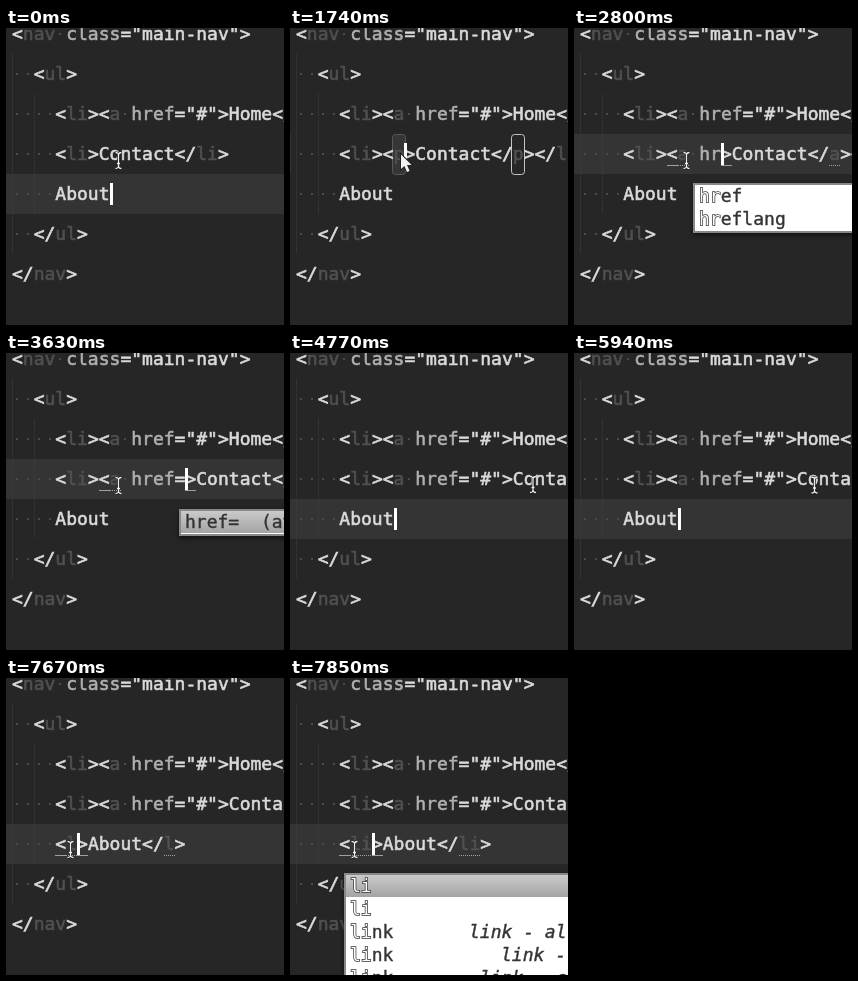
An HTML page with a canvas for the animation above (8 s loop, 278 by 297 pixels).

```html
<!DOCTYPE html>
<html lang="en">
<meta charset="utf-8">
<title>Wrapping text in tags</title>
<style>
html, body { margin: 0; width: 100%; height: 100%; overflow: hidden; background: #262626; }
canvas { display: block; }
</style>
<canvas width="278" height="297"></canvas>
<script>
const ctx = document.querySelector('canvas').getContext('2d');
const FONT = '18px "DejaVu Sans Mono", monospace';
const CHAR = 10.84, LIGHT = '#dadada', ATTR = '#b0b0b0', DIM = '#505050';
const LOOP = 8000, ITEM = 23;
const colX = col => 6 + col * CHAR;
const rowY = row => 6 + row * 40;

// Each step changes some properties of the editor from its time on.
const link = attr => `    <li><a${attr}>Contact</a></li>`;
const plain = { sel: [], under: [], arrow: false, popup: null };
const typing = (attr, popup = null) => ({
  ...plain, contact: link(attr), row: 3, col: 10 + attr.length, popup,
  under: [8, [9, 1], 10 + attr.length, [20 + attr.length, 1]]
});
const wrapped = (name, popup = null) => ({
  ...plain, about: `    <${name}>About</${name}>`, col: 5 + name.length, popup,
  under: [4, [5, name.length], 5 + name.length, [13 + name.length, name.length]]
});
const tagList = { x: 98, y: 155, typed: 1, items: ['a', 'abbr', 'acronym', 'address', 'applet', 'area'] };
const hrefList = { x: 120, y: 155, typed: 1, items: ['href', 'hreflang'] };
const valueList = { x: 174, y: 156, typed: 0, picked: true, items: ['href=  (attribute)'] };
const liList = {
  x: 55, y: 195, typed: 2, picked: true, items: ['li', 'li', 'link', 'link', 'link'],
  notes: [, , [179, 'link - alternate'], [211, 'link - atom'], [190, 'link - css']]
};
const steps = [
  [0, { ...plain, contact: '    <li>Contact</li>', about: '    About', row: 4, col: 9 }],
  [630, { row: 3, col: 10, under: [4, 7, 15] }],
  [770, { ...plain, col: 15, sel: [[8, 15]], arrow: true }],
  [1740, { contact: '    <li><p>Contact</p></li>', col: 10, sel: [[9, 10], [20, 21, 1]] }],
  [2370, typing('')],
  [2440, typing('', tagList)],
  [2580, typing(' ')],
  [2650, typing(' h')],
  [2730, typing(' h', hrefList)],
  [2800, typing(' hr', { ...hrefList, typed: 2 })],
  [2860, typing(' hre', { ...hrefList, typed: 3 })],
  [2930, typing(' href', { ...hrefList, typed: 4 })],
  [3000, typing(' href')],
  [3630, typing(' href=', valueList)],
  [3690, { ...typing(' href=""'), col: 17 }],
  [4110, { ...typing(' href="#"'), col: 18 }],
  [4770, { ...plain, row: 4, col: 9 }],
  [6750, { col: 5 }],
  [6810, { col: 9, sel: [[4, 9]], arrow: true }],
  [7230, { about: '    <p>About</p>', col: 6, sel: [[5, 6], [14, 15, 1]] }],
  [7650, wrapped('l')],
  [7720, wrapped('l', { ...liList, typed: 1 })],
  [7780, wrapped('li', { ...liList, typed: 1 })],
  [7850, wrapped('li', liList)]
];

function stateAt(t) {
  return Object.assign({}, ...steps.filter(s => s[0] <= t).map(s => s[1]));
}

const ease = u => u * u * (3 - 2 * u);
const phase = (t, from, to) => Math.min(1, Math.max(0, (t - from) / (to - from)));

function pointerAt(t) {
  if (t < 4770) return [112.5, 132.5];
  const out = ease(phase(t, 5910, 6400)), back = ease(phase(t, 6400, 6630));
  return [243 - 219 * out + 40.5 * back, 131.5 + 45 * out - 5 * back];
}

function rect(x, y, w, h, color) {
  ctx.fillStyle = color;
  ctx.fillRect(x, y, w, h);
}

// A hairline around the glyphs gives the slightly heavy editor type.
function type(text, x, y, color, weight = .6) {
  ctx.fillStyle = ctx.strokeStyle = color;
  ctx.lineWidth = weight;
  ctx.strokeText(text, x, y);
  ctx.fillText(text, x, y);
}

function codeLine(text, row) {
  const y = rowY(row);
  let inTag = false, isName = false, quoted = false;
  ctx.font = FONT;
  for (const { 0: token, index } of text.matchAll(/<\/?|\w+|./g)) {
    let color = LIGHT;
    if (token[0] === '<') inTag = isName = true;
    else if (token === '>') inTag = false;
    else if (token === '"') quoted = !quoted;
    else if (token === ' ') {
      rect(Math.round(colX(index) + 4), y - 1, 2, 2, '#4a4a4a');
      continue;
    } else if (/\w/.test(token) && inTag && !quoted) {
      color = isName ? DIM : ATTR;
      isName = false;
    }
    type(token, colX(index), y + 6, color);
  }
}

function guide(x, top, bottom) {
  for (let y = top; y < bottom; y += 2) rect(x, y, 1, 1, '#3e3e3e');
}

function selection([from, to, outlined], row) {
  ctx.beginPath();
  ctx.roundRect(Math.floor(colX(from)) - .5, rowY(row) - 19.5, Math.round((to - from) * CHAR) + 2, 40, 3);
  ctx.fillStyle = outlined ? '#262626' : '#363636';
  ctx.fill();
  ctx.strokeStyle = outlined ? '#c4c4c4' : '#585858';
  ctx.lineWidth = 1;
  ctx.stroke();
}

function underline(mark, row) {
  const [col, count] = Array.isArray(mark) ? mark : [mark, 0];
  const x = Math.round(colX(col)), y = rowY(row) + 11;
  if (!count) rect(x, y, 11, 1, '#a0a0a0');
  for (let i = 0; i < count * CHAR; i += 2) rect(x + i, y, 1, 1, '#a0a0a0');
}

function popup({ x, y, typed, picked, items, notes = [] }) {
  const h = items.length * ITEM + 4;
  ctx.save();
  ctx.shadowColor = 'rgba(0,0,0,.6)';
  ctx.shadowBlur = 5;
  ctx.shadowOffsetY = 2;
  rect(x - 1, y, 300, h, '#888');
  ctx.restore();
  rect(x + 1, y + 2, 300, h - 4, '#fff');
  if (picked) {
    const shade = ctx.createLinearGradient(0, y + 2, 0, y + 25);
    shade.addColorStop(0, '#cacaca');
    shade.addColorStop(1, '#a2a2a2');
    rect(x + 1, y + 2, 300, ITEM - 1, shade);
  }
  items.forEach((item, i) => {
    const base = y + 19 + i * ITEM;
    ctx.font = FONT;
    [...item].forEach((ch, k) => {
      const cx = x + 5 + k * CHAR;
      if (k < typed) {
        type(ch, cx, base, '#333', 1.4);
        ctx.fillStyle = '#fff';
        ctx.fillText(ch, cx, base);
      } else type(ch, cx, base, '#333', .4);
    });
    if (notes[i]) {
      ctx.font = 'italic ' + FONT;
      type(notes[i][1], notes[i][0], base, '#333', .4);
    }
  });
}

const ibeam = new Path2D('M-3-8Q0-8 0-5.5Q0-8 3-8M0-5.5V5.5M-3 8Q0 8 0 5.5Q0 8 3 8M-1.5 3H1.5');
const arrow = new Path2D('M0 0V14.5L3.4 11.4L6 17.5L8.6 16.4L6 10.5H10.6Z');

function pointer([x, y], isArrow) {
  ctx.save();
  if (isArrow) {
    ctx.translate(x - 1.5, y - 6);
    ctx.lineWidth = 2;
    ctx.strokeStyle = '#222';
    ctx.stroke(arrow);
    ctx.fillStyle = '#f2f2f2';
    ctx.fill(arrow);
  } else {
    ctx.translate(x, y);
    ctx.lineWidth = 2.6;
    ctx.strokeStyle = '#111';
    ctx.stroke(ibeam);
    ctx.lineWidth = 1.3;
    ctx.strokeStyle = '#f0f0f0';
    ctx.stroke(ibeam);
  }
  ctx.restore();
}

function draw(t) {
  const s = stateAt(t), y = rowY(s.row);
  rect(0, 0, 278, 297, '#262626');
  rect(0, y - 20, s.sel.length ? 1 : 278, 40, '#343434');
  guide(6, 26, 226);
  guide(28, 66, 186);
  s.sel.forEach(range => selection(range, s.row));
  ['<nav class="main-nav">', '  <ul>', '    <li><a href="#">Home</a></li>',
    s.contact, s.about, '  </ul>', '</nav>'].forEach(codeLine);
  s.under.forEach(mark => underline(mark, s.row));
  rect(Math.round(colX(s.col)), y - 11, 3, 22, '#fff');
  if (s.popup) popup(s.popup);
  pointer(pointerAt(t), s.arrow);
}

const start = performance.now();
function tick() {
  draw((performance.now() - start) % LOOP);
  requestAnimationFrame(tick);
}
tick();
</script>
</html>
```
